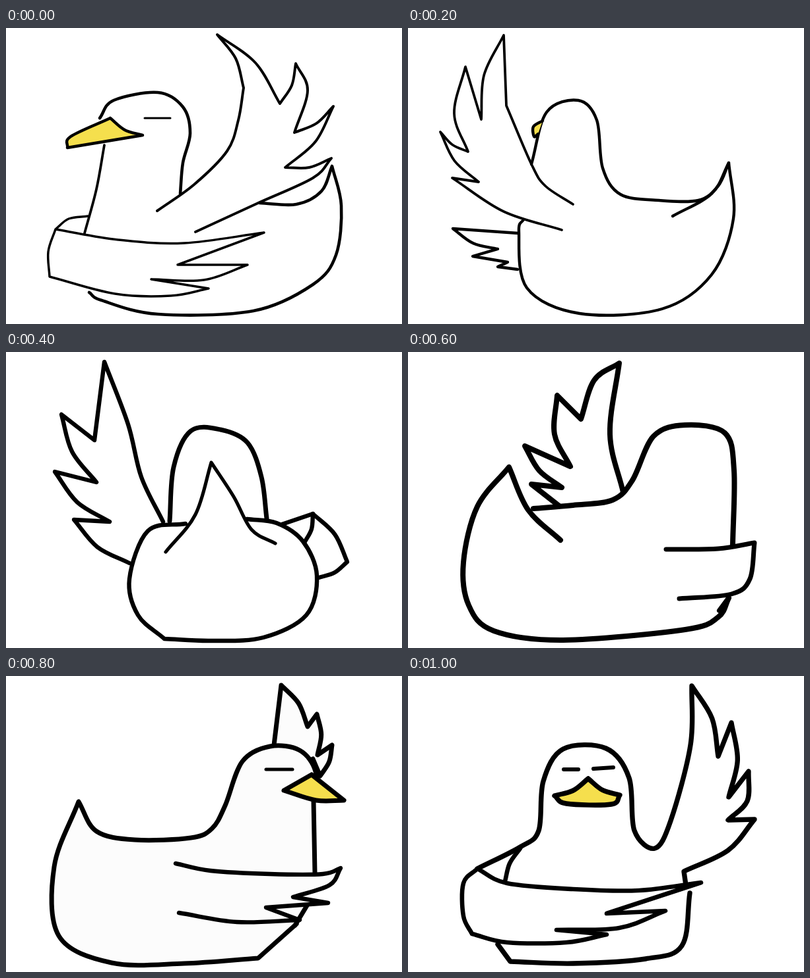
Write an HTML page with a canvas that moves like this. It is 600 by 450 pixels and loops after 1.2 s.

```html
<!DOCTYPE html>
<html lang="en">
<head>
<meta charset="utf-8">
<title>Turning bird</title>
<style>
html, body { margin: 0; width: 100%; height: 100%; overflow: hidden; background: #fff; }
canvas { display: block; width: 100%; height: 100%; }
</style>
</head>
<body>
<canvas width="600" height="450"></canvas>
<script>
const ctx = document.querySelector("canvas").getContext("2d");
const yellow = "#f5df4d", pale = "#fcfcfc";

// Smooth curve through a run of points.
function curve(path, run) {
  const at = (i, j) => run[i] || [2 * run[j][0] - run[2 * j - i][0], 2 * run[j][1] - run[2 * j - i][1]];
  for (let i = 1; i < run.length; i++) {
    const a = run[i - 1], b = run[i], before = at(i - 2, i - 1), after = at(i + 1, i);
    path.bezierCurveTo(
      a[0] + (b[0] - before[0]) / 6, a[1] + (b[1] - before[1]) / 6,
      b[0] - (after[0] - a[0]) / 6, b[1] - (after[1] - a[1]) / 6, b[0], b[1]);
  }
}

// "/" marks a corner; "(" and ")" are corners whose next edge bows left or right.
function ink(width, text, fill) {
  const path = new Path2D();
  let run = [], bow = 0;
  const points = text.split(" ");
  points.forEach((word, i) => {
    const p = word.split(",").map(parseFloat), mark = word.at(-1);
    if (i === 0) path.moveTo(...p);
    if (bow) {
      const [x, y] = run[0], dx = p[0] - x, dy = p[1] - y;
      run.push([x + dx / 2 + dy * bow, y + dy / 2 - dx * bow]);
      bow = 0;
    }
    run.push(p);
    const corner = "/()".includes(mark);
    if (corner || i === points.length - 1) {
      curve(path, run);
      run = [p];
      bow = { "(": 0.1, ")": -0.1 }[mark] || 0;
    }
  });
  if (fill) {
    ctx.fillStyle = fill;
    ctx.fill(path);
  }
  ctx.lineWidth = width;
  ctx.stroke(path);
}

function facingLeft() {
  ink(4, "229,278 285,238 335,187 352,140 360,91) 320,10( 415,115) 439,54/ 457,95 437,159) 496,119( 423,212) 493,198/ 465,228 380,267 287,310");
  ink(4.6, "384,266 440,268 478,248 494,210/ 508,270 500,345 465,390 375,430 230,435 145,414 126,402");
  ink(4.6, "142,137 163,110 230,98 268,120 279,160 268,205 264,252");
  ink(3.8, "149,178 137,245 119,312");
  ink(4.5, "158,137) 207,163/ 93,182/ 98,165 158,137", yellow);
  ink(3, "210,137 249,137");
  ink(3.5, "124,286 95,290 75,306/ 64,340 66,378/ 165,404 250,407 307,396/ 220,382/ 300,383 366,360/ 260,360/ 391,311/ 270,327 170,322 75,306");
}

function turningAway() {
  ink(3.8, "250,268 208,240 187,207 149,118/ 145,11) 111,139/ 87,59/ 70,130 91,188( 49,158) 107,234/ 67,228/ 145,279 233,307");
  ink(4.4, "187,207 210,128 258,110 286,140 295,213 322,253 380,262 440,262 470,240 486,205/ 493,290 460,375 385,427 260,434 180,395 168,310 175,291");
  ink(4.4, "486,205 460,252 401,286");
  ink(4.4, "204,141 190,150 191,165 197,161", yellow);
  ink(4.4, "167,312/ 68,305) 136,336/ 98,347/ 151,356/ 136,363/ 166,367");
}

function fromBehind() {
  ink(6.4, "238,258 205,190 185,110 149,15/ 134,134/ 84,95) 137,198/ 74,182) 157,258/ 103,255) 187,321");
  ink(7, "248,257 254,175 280,120 325,118 366,138 387,190 395,253");
  ink(5.2, "242,304 287,247 311,168/ 345,220 372,270 408,291");
  ink(6.4, "272,261 215,272 187,345 200,400 240,436/ 310,439 390,434 455,400 471,340 450,288 410,260 365,254");
  ink(6.4, "418,262/ 465,246( 517,319( 474,343");
  ink(6.4, "465,246( 452,290");
}

function turningBack() {
  ink(8, "326,213 306,125 320,17/ 282,43 262,102/ 226,66/ 222,125 246,174/ 177,143) 233,206/ 187,201/ 229,234");
  ink(8, "190,238 250,233 310,225 340,195 372,128 420,111 480,123 494,180 492,293");
  ink(8, "231,286 182,240 153,175/ 105,235 84,320 92,385 130,424 235,438 420,422 470,403 486,374/ 472,393");
  ink(7, "391,300 470,299 525,290/ 518,345 490,368 411,375");
}

function facingRight() {
  ink(7, "406,105/ 417,14( 457,77/ 471,58( 472,120/ 494,105( 476,152/ 465,126", pale);
  ink(7, "468,300/ 466,190/ 469,145 445,113 400,107 358,130 332,197 312,232 280,246 195,249 137,236 110,191/ 73,290 80,395 160,436 270,437 382,429/ 440,377", pale);
  ink(7, "463,150/ 512,189/ 470,189 421,174/ 463,150", yellow);
  ink(5, "394,142 434,142");
  ink(6.4, "257,285 310,296 400,301 480,301 507,292/ 490,318 435,336/ 488,345/ 394,352/ 445,371/ 350,374 262,360", pale);
  ink(7, "456,349 438,379");
}

function facingFront() {
  ink(7.4, "105,293 170,260 198,235 205,160 235,111 300,110 335,155 343,235 374,262 398,220 428,105 430,15( 470,122/ 490,71( 486,184/ 516,145/ 514,190 485,219/ 525,218/ 485,265 418,297/ 421,318");
  ink(6.6, "105,293 84,315 84,365 97,392/ 150,405 240,405 301,393/ 225,386/ 320,383 390,357/ 301,361/ 444,314/ 350,326 250,324 150,315 105,293");
  ink(6.6, "170,262 154,285 147,312");
  ink(7.4, "136,408 155,434/ 250,437 360,430 415,410 427,330");
  ink(6, "236,142 258,142");
  ink(6, "281,141 311,139");
  ink(7.4, "273,156) 321,181/ 308,195 240,194 222,182) 273,156", yellow);
}

const poses = [facingLeft, turningAway, fromBehind, turningBack, facingRight, facingFront];
const hold = 200;

function draw() {
  ctx.clearRect(0, 0, 600, 450);
  ctx.lineCap = ctx.lineJoin = "round";
  poses[Math.floor(performance.now() / hold) % poses.length]();
  requestAnimationFrame(draw);
}
draw();
</script>
</body>
</html>
```
